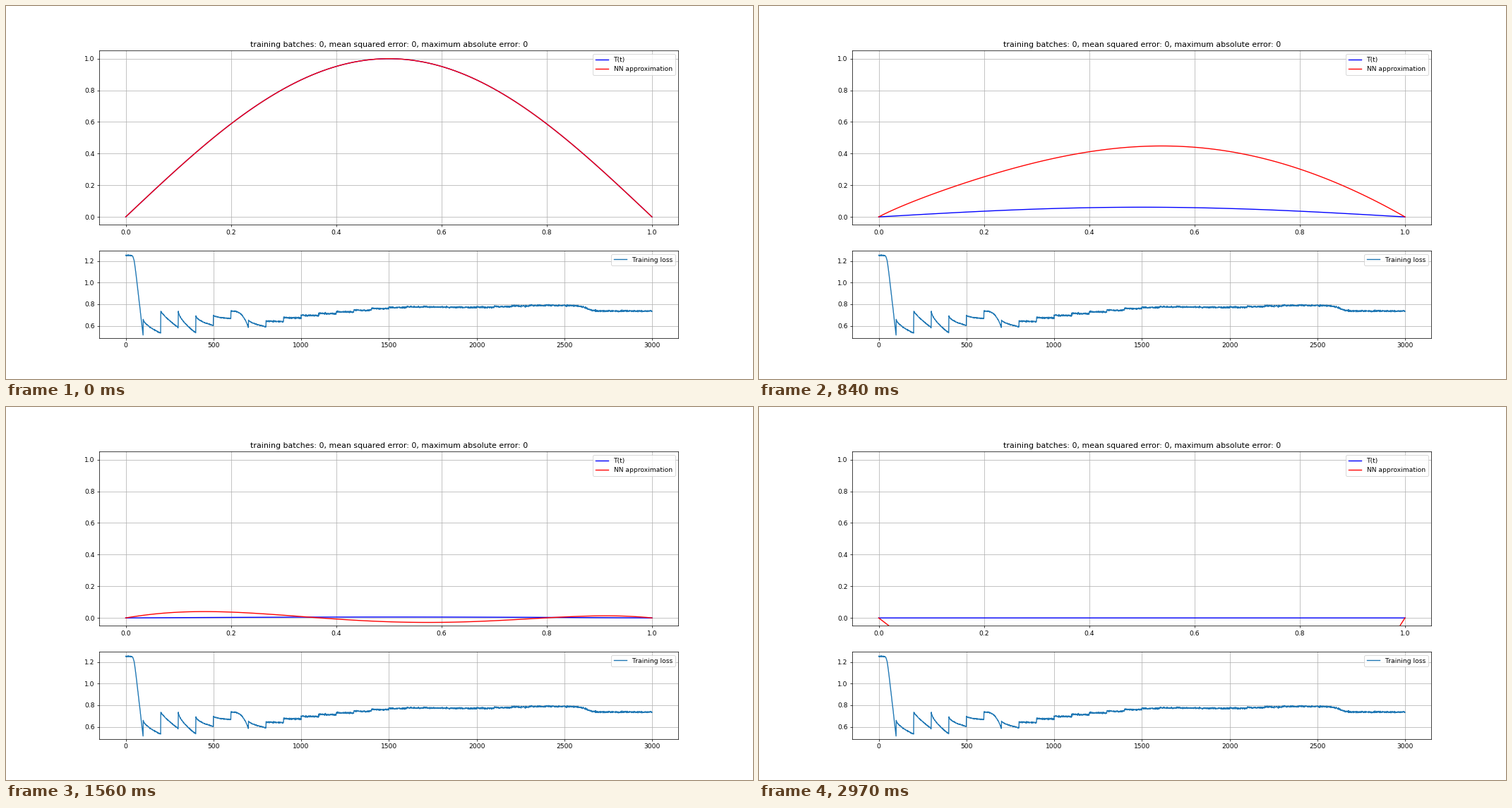
Recreate the animation shown at these times as a matplotlib script. Size 1058 by 529 pixels, loop 3 s.

```python
import numpy as np
import matplotlib.pyplot as plt
from matplotlib.animation import FuncAnimation

FRAMES = 100
INTERVAL = 30

plt.rcParams["font.family"] = "DejaVu Sans"
rng = np.random.default_rng(4)

x = np.linspace(0, 1, 100)
wave = np.sin(np.pi * x)


def exact(t):
    """Heat equation on a rod with cold ends."""
    return np.exp(-np.pi ** 2 * t) * wave


def network(t):
    """Network output: a line between the ends minus a hump that moves right."""
    left = -0.95 - 1.6 * t
    right = -4.2 * t - t ** 6
    hump = x ** (0.45 + 5 * t ** 3) * (1 - x) ** (0.8 + 0.5 * t)
    return left + (right - left) * x - (7 + 10 * t ** 3) * hump


def approximation(t):
    # The ansatz keeps the initial and boundary values exact
    return (1 - t) * wave + t * x * (1 - x) * network(t)


def training_loss():
    """Training restarts every 100 batches, which leaves a step in the loss."""
    b = np.arange(100)
    first = 1.255 - 0.0141 * 4 * np.logaddexp(0, (b - 46.4) / 4)

    # Start, end and power of the curve between them
    restarts = [(.660, .532, .6), (.737, .583, .8), (.737, .536, .6),
                (.697, .603, .5), (.700, .667, .4), (.737, .585, 3),
                (.653, .591, .6)]
    early = [s + (e - s) * (b / 99) ** p for s, e, p in restarts]
    early = np.concatenate([first, *early])

    # Steps climb to a plateau with a slow swell, then sink once
    batch = np.arange(800, 3000)
    step = np.minimum(batch // 100, 24)
    late = (0.784 - 0.15 * np.exp(-(step - 8) / 3.6)
            + 0.007 * np.cos(2 * np.pi * (step - 15.5) / 8))
    late += 0.004 * np.exp(-(batch - 100 * step) / 20)
    late -= 0.052 / (1 + np.exp((2624 - batch) / 20))

    return np.concatenate([early + rng.normal(0, .002, early.size),
                           late + rng.normal(0, .0036, late.size)])


fig, (top, low) = plt.subplots(2, 1, figsize=(16, 8), dpi=66.125,
                               gridspec_kw={"height_ratios": [2, 1]})

top.set_title("training batches: 0, mean squared error: 0, "
              "maximum absolute error: 0")
true_line, = top.plot(x, exact(0), color="blue", label="T(t)")
net_line, = top.plot(x, approximation(0), color="red",
                     label="NN approximation")
top.set_xlim(-.05, 1.05)
top.set_ylim(-.05, 1.05)

low.plot(training_loss(), label="Training loss")
low.set_xlim(-149.95, 3148.95)
low.set_ylim(.4866, 1.2957)

for ax in (top, low):
    ax.grid()
    ax.legend(loc="upper right")


def update(n):
    t = n / (FRAMES - 1)
    true_line.set_ydata(exact(t))
    net_line.set_ydata(approximation(t))
    return true_line, net_line


anim = FuncAnimation(fig, update, frames=FRAMES, interval=INTERVAL,
                     repeat=True, repeat_delay=0)
plt.show()
```
